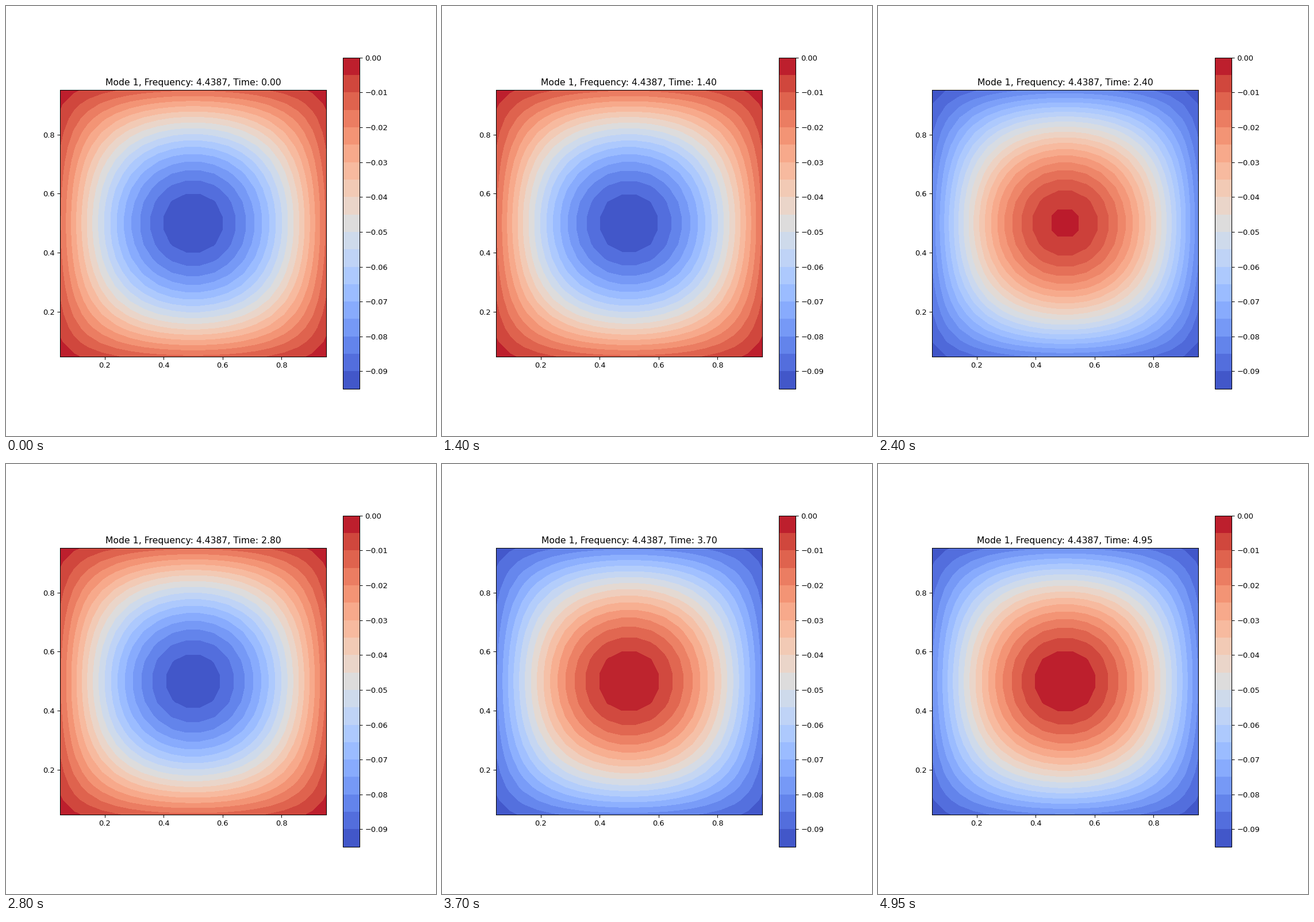
A matplotlib script for the animation above (5 s loop, 748 by 748 pixels).

```python
import numpy as np
import matplotlib.pyplot as plt
from matplotlib.animation import FuncAnimation

N = 20                 # interior grid points per side
FRAMES = 100
DT = 0.05              # seconds per frame

# First eigenmode of the five-point Laplacian on the unit square
h = 1 / (N + 1)
x = np.arange(1, N + 1) * h
half_wave = np.sin(np.pi * x)
mode = -2 * h * np.outer(half_wave, half_wave)
omega = 2 * np.sqrt(2) * np.sin(np.pi * h / 2) / h

fig, ax = plt.subplots(figsize=(8, 8), dpi=93.5)
ax.set_aspect("equal")


def draw_mode(t):
    ax.set_title(f"Mode 1, Frequency: {omega:.4f}, Time: {t:.2f}")
    return ax.contourf(x, x, mode * np.cos(omega * t), levels=20, cmap="coolwarm")


# The colour bar keeps the scale of the starting state
fig.colorbar(draw_mode(0), ax=ax)


def update(frame):
    for old in list(ax.collections):
        old.remove()
    return [draw_mode(frame * DT)]


anim = FuncAnimation(fig, update, frames=FRAMES, init_func=lambda: update(0),
                     interval=1000 * DT, repeat=True, repeat_delay=0, blit=False)

plt.show()
```
